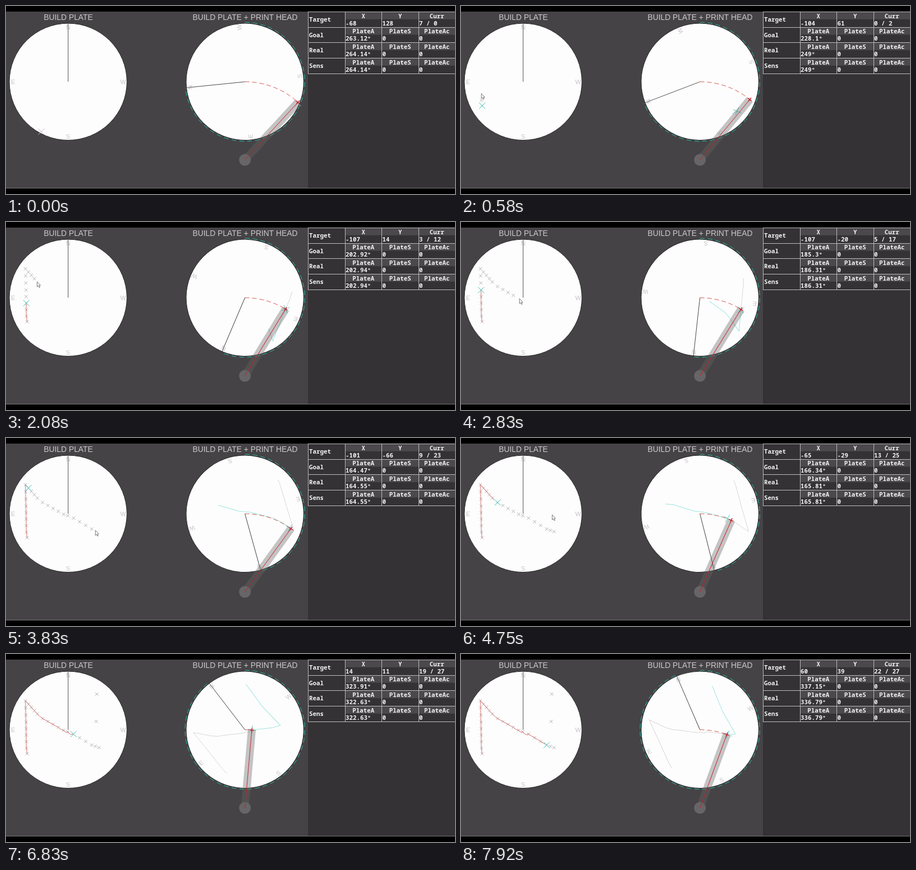
An HTML page with a canvas for the animation above (8000 ms loop, 800 px wide and 337 px high).

```html
<!DOCTYPE html>
<html lang="en">
<head>
<meta charset="utf-8">
<title>Build plate</title>
<style>
  html, body { margin: 0; width: 100%; height: 100%; overflow: hidden; background: #000; }
  canvas { display: block; width: 800px; height: 337px; }
</style>
</head>
<body>
<canvas id="stage"></canvas>
<script>
const LOOP = 8000, SCALE = 0.7, RADIUS = 104.7, ARM = 140, COUNT = 27;
const SHOW = 250, CLICK_LAG = 100, START = SHOW + CLICK_LAG, HIDE = 6600;
const LEFT = 110.7, RIGHT = 425.7, MIDDLE = 135.8, PIVOT = MIDDLE + ARM;
const TURN = 2 * Math.PI, UP = -Math.PI / 2, DEG = Math.PI / 180;
const SANS = '"Liberation Sans", Arial, sans-serif';
const MONO = '"Noto Sans Mono", "DejaVu Sans Mono", monospace';
const CYAN = '#45c8be', RED = '#c8202a', GRAY = '#b9b9b9';

// Corners of the drawn path: waypoint index, x, y in plate units (y down).
// The last corner only leads the pointer off the stage.
const path = [[0, -104.3, 61.4], [1, -106, 47.26], [5, -107.03, -19.81], [8, -108.6, -74.3],
  [12, -78.4, -40.4], [13, -65.07, -28.85], [17, -11.4, 1.4], [18, -0.96, 5.01],
  [19, 13.91, 11.12], [22, 59.91, 39.13], [24, 78.6, 45.7], [25, 71.4, -21.4],
  [26, 72.9, -91.4], [27, -160, 224]];
const restTarget = [-68.3, 127.8];

// Time to waypoint index, for the print head and for the pointer
const travel = [[START, -1], [900, 0], [1286, 1], [2878, 5], [4907, 13], [5743, 17],
  [6340, 18], [6841, 19], [7964, 22], [9000, 24]];
const pointing = [[SHOW, 0], [1250, 6.1], [2830, 17.2], [4000, 24], [4750, 24.64],
  [5500, 25], [5920, 26], [6050, 26], [HIDE, 27]];

const lerp = (a, b, k) => a + (b - a) * k;
const toPixels = p => p.map(v => v * SCALE);

function sample(steps, at) {
  const next = steps.findIndex(s => at < s[0]);
  if (next === 0) return steps[0].slice(1);
  if (next < 0) return steps[steps.length - 1].slice(1);
  const a = steps[next - 1], b = steps[next], k = (at - a[0]) / (b[0] - a[0]);
  return a.slice(1).map((v, i) => lerp(v, b[i + 1], k));
}

// Head distance from the plate centre and plate rotation that bring a point under the head
function solve([x, y]) {
  const r = Math.hypot(x, y) * SCALE;
  const rot = (Math.asin(r / (2 * ARM)) - Math.atan2(y, x)) / DEG;
  return { r, rot: (rot + 720) % 360 };
}

const points = Array.from({ length: COUNT }, (_, i) => sample(path, i));
const poses = points.map(solve);
const restPose = { r: solve(restTarget).r, rot: 264.14 };

function poseAt(progress) {
  const i = Math.floor(progress), k = progress - i;
  const a = i < 0 ? restPose : poses[i], b = poses[i + 1];
  return { r: lerp(a.r, b.r, k), rot: lerp(a.rot, b.rot, k) };
}

function headOnPlate(progress) {
  const { r, rot } = poseAt(progress);
  const angle = Math.asin(r / (2 * ARM)) - rot * DEG;
  return [r * Math.cos(angle), r * Math.sin(angle)];
}

const canvas = document.getElementById('stage');
const c = canvas.getContext('2d');
const ratio = window.devicePixelRatio || 1;
canvas.width = 800 * ratio;
canvas.height = 337 * ratio;

function rect(x, y, w, h, color) {
  c.fillStyle = color;
  c.fillRect(x, y, w, h);
}

function stroke(color, width) {
  c.strokeStyle = color;
  c.lineWidth = width;
  c.stroke();
}

function line(pts, color, width = 1) {
  c.beginPath();
  pts.forEach(p => c.lineTo(...p));
  stroke(color, width);
}

function dashedArc(x, y, r, sweep, color, dash) {
  c.beginPath();
  c.arc(x, y, r, UP, UP + sweep);
  c.setLineDash(dash);
  stroke(color, 1);
  c.setLineDash([]);
}

function disc(x, y, r, color) {
  c.beginPath();
  c.arc(x, y, r, 0, TURN);
  c.fillStyle = color;
  c.fill();
}

function cross([x, y], s, color, width) {
  line([[x - s, y - s], [x + s, y + s]], color, width);
  line([[x - s, y + s], [x + s, y - s]], color, width);
}

function text(str, x, y, font, color, align = 'left') {
  c.font = font;
  c.fillStyle = color;
  c.textAlign = align;
  c.fillText(str, x, y);
}

// Draws a plate; `content` paints in plate coordinates
function plate(x, rot, content) {
  c.save();
  c.translate(x, MIDDLE);
  c.rotate(rot * DEG);
  disc(0, 0, RADIUS, '#fefdfe');
  stroke('#2a2a2a', 1);
  [...'NWSE'].forEach((name, i) => {
    const a = UP + i * Math.PI / 2;
    text(name, 98 * Math.cos(a), 98 * Math.sin(a) + 3.9, '11px ' + SANS, '#c6c4c6', 'center');
  });
  line([[0, 0], [0, -RADIUS]], '#3c3c3c', 0.9);
  content();
  c.restore();
}

function arm(r) {
  const swing = 2 * Math.asin(r / (2 * ARM));
  dashedArc(RIGHT, PIVOT, ARM, swing, '#d4574c', [8, 5]);
  c.save();
  c.translate(RIGHT, PIVOT);
  disc(0, 0, 10.5, '#676567');
  c.rotate(swing);
  rect(-7, -ARM, 14, ARM, 'rgba(100,100,100,0.38)');
  line([[0, 0], [0, -ARM]], RED, 0.9);
  line([[-4, -ARM], [4, -ARM]], RED, 1.5);
  line([[0, -ARM - 4], [0, -ARM + 4]], RED, 1.5);
  c.restore();
}

function table(target, curr, real) {
  const angle = v => Number(v.toFixed(2)) + '°';
  const row = (label, rot) => [label, ['PlateA', 'PlateS', 'PlateAc'], [angle(rot), 0, 0]];
  const rows = [
    ['Target', ['X', 'Y', 'Curr'], [...target.map(Math.round), curr]],
    row('Goal', solve(target).rot), row('Real', real), row('Sens', real)
  ];
  const font = '600 10.8px ' + MONO, left = 538.5, step = 65.5, height = 27.7;
  rows.forEach(([label, heads, values], i) => {
    const top = 10.5 + i * height;
    text(label, 540, top + 17.5, font, '#f4f4f4');
    heads.forEach((head, j) => {
      const x = left + step * (j + 1);
      rect(x, top, step, 13.3, '#4b494b');
      text(head, x + step / 2, top + 11, font, '#f4f4f4', 'center');
      text(values[j], x + 1, top + 24, font, '#f4f4f4');
    });
  });
  for (let i = 0; i <= rows.length; i++) {
    const y = Math.round(10 + i * height) + 0.5, x = Math.round(538 + i * step) + 0.5;
    line([[538, y], [800, y]], '#bdbdbd');
    line([[x, 10], [x, 121.5]], '#bdbdbd');
  }
}

function arrow(x, y) {
  c.save();
  c.translate(x, y);
  c.beginPath();
  [[0, 0], [0, 9], [2, 7.2], [3.6, 10.4], [5, 9.7], [3.6, 6.6], [6, 6.4]].forEach(p => c.lineTo(...p));
  c.closePath();
  c.fillStyle = '#fff';
  c.fill();
  stroke('#555', 0.8);
  c.restore();
}

function draw(t) {
  const started = t >= START;
  const [progress] = sample(travel, t);
  const clicked = Math.floor(sample(pointing, t - CLICK_LAG)[0]) + 1;
  const count = started ? Math.min(COUNT, clicked) : 0;
  const index = Math.floor(progress) + 1;
  const target = started ? points[index] : restTarget;
  const mark = toPixels(target), markColor = started ? CYAN : GRAY;
  const pose = poseAt(progress);
  const placed = points.slice(0, count).map(toPixels);

  const trace = [];
  for (let p = 0; p < progress; p += 0.1) trace.push(headOnPlate(p));
  if (progress > 0) trace.push(headOnPlate(progress));

  c.setTransform(ratio, 0, 0, ratio, 0, 0);
  rect(0, 0, 800, 337, '#000');
  rect(0, 10, 538, 317, '#454345');
  rect(538, 10, 262, 317, '#343234');
  rect(0, 326, 800, 1, '#777577');
  text('BUILD PLATE', 111, 25.2, '13.85px ' + SANS, '#cbc9cb', 'center');
  text('BUILD PLATE + PRINT HEAD', 426, 25.2, '13.85px ' + SANS, '#cbc9cb', 'center');

  plate(LEFT, 0, () => {
    placed.forEach(p => cross(p, 2.8, '#a8a8a8', 0.9));
    line(trace, '#cf5a55', 0.9);
    cross(mark, 5.5, markColor, 1);
  });

  plate(RIGHT, pose.rot, () => {
    line(trace, '#d2d2d2', 0.9);
    if (started) line(placed.slice(index), '#9be6dc', 1);
    cross(mark, 5.5, markColor, 0.9);
  });
  dashedArc(RIGHT, MIDDLE, 106.6, pose.rot * DEG, '#25bfae', [8.5, 5.5]);
  arm(pose.r);

  table(target, started ? `${index} / ${count}` : '7 / 0', pose.rot);
  if (t >= SHOW && t < HIDE) {
    const [x, y] = toPixels(sample(path, sample(pointing, t)[0]));
    arrow(LEFT + x, MIDDLE + y);
  }
}

const begin = performance.now();
function tick() {
  draw((performance.now() - begin) % LOOP);
  requestAnimationFrame(tick);
}
tick();
</script>
</body>
</html>
```
